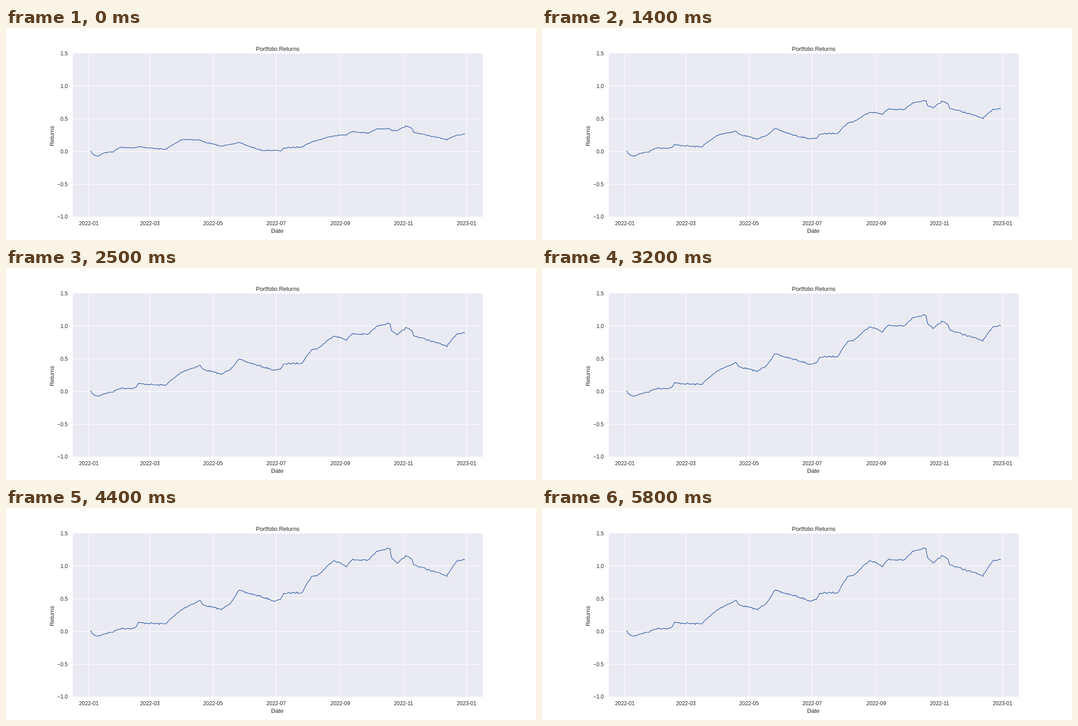
These frames come from a looping animation (1183x473 px, 5900 ms). An HTML page:

```html
<!DOCTYPE html>
<html lang="en">
<head>
<meta charset="utf-8">
<title>Portfolio Returns</title>
<style>
  html, body { margin: 0; height: 100%; overflow: hidden; background: #fff; }
  svg { display: block; }
  text { font: 11.92px "Liberation Sans", Arial, sans-serif; fill: #262626; text-anchor: middle; }
  .big { font-size: 13px; }
  .y { text-anchor: end; }
  #grid { stroke: #fff; stroke-width: 1.1; }
  #curve { fill: none; stroke: #4c72b0; stroke-width: 1.63; stroke-linejoin: round; stroke-linecap: round; }
</style>
</head>
<body>
<svg width="1183" height="473" viewBox="0 0 1183 473">
  <rect x="149" y="57" width="915" height="364" fill="#eaeaf2"/>
  <path id="grid"/>
  <g id="labels"></g>
  <text class="big" x="606.5" y="50.5">Portfolio Returns</text>
  <text class="big" x="605.5" y="456.5">Date</text>
  <text class="big" transform="translate(107.3 241) rotate(-90)">Returns</text>
  <polyline id="curve"/>
</svg>
<script>
const LOOP = 5900, STEP = 100;
const $ = id => document.getElementById(id);
const dayX = day => 184.85 + day * 2.31;

// Turning points: x, first height, settled height
const turns = [
  [189,275,275], [195,283,283], [206,286,286], [218,278,281], [240,276,276], [252,266,269],
  [288,267,268], [296,265,256], [355,271,259], [394,248,225], [434,250,206], [438,253,216],
  [481,264,227], [500,259,213], [520,256,185], [570,273,198], [601,273,209], [614,275,204],
  [619,268,191], [660,265,189], [681,255,155], [697,250,150], [732,240,117], [760,238,131],
  [773,231,116], [808,235,118], [831,224,95], [857,225,91], [860,228,110], [873,230,126],
  [892,219,108], [905,223,114], [911,233,128], [984,249,152], [1008,239,118], [1024,236,115]];

function height(x, col) {
  const i = turns.findIndex(p => p[0] >= x);
  const a = turns[i - 1], b = turns[i];
  return a[col] + (b[col] - a[col]) * (x - a[0]) / (b[0] - a[0]);
}

let seed = 7;
const random = () => (seed = seed * 16807 % 2147483647) / 2147483647;
const hump = (x, mid, width) => Math.exp(-(((x - mid) / width) ** 2));

// One point per trading day; the year starts on a Saturday
const points = [];
for (let day = 2; day <= 363; day++) {
  if (day % 7 < 2) continue;
  const x = dayX(day);
  points.push({ x, from: height(x, 1), to: height(x, 2), noise: random() - .5,
                sag: hump(x, 670, 170), lift: hump(x, 925, 75) });
}

function label(text, x, y, cls = "") {
  $("labels").insertAdjacentHTML("beforeend", `<text class="${cls}" x="${x}" y="${y}">${text}</text>`);
}

let grid = "";
["1.5", "1.0", "0.5", "0.0", "−0.5", "−1.0"].forEach((text, i) => {
  const y = 57 + i * 72.8;
  label(text, 138, y + 4.4, "y");
  if (i % 5) grid += `M149 ${Math.floor(y) + .5}H1064`;
});
for (let month = 0; month <= 12; month += 2) {
  const date = new Date(Date.UTC(2022, month, 1));
  const x = dayX((date - Date.UTC(2022, 0, 1)) / 864e5);
  label(date.toISOString().slice(0, 7), x.toFixed(1), 440.2);
  grid += `M${Math.floor(x) + .5} 57V421`;
}
$("grid").setAttribute("d", grid);

function draw(now) {
  const t = Math.floor(now % LOOP / STEP) * STEP / 1000;
  const blend = 1.01 * Math.sin(Math.PI / 2 * Math.min(t / 4.6, 1));
  const early = Math.min(t / 3.2, 1);
  const sag = 6 * Math.sin(Math.PI * early ** 1.5);
  const lift = 6 * Math.sin(Math.PI * Math.sqrt(early));
  $("curve").setAttribute("points", points.map(p => {
    const y = p.from + (p.to - p.from) * blend + sag * p.sag - lift * p.lift
      + p.noise * (2 + 1.5 * blend);
    return `${p.x.toFixed(2)},${y.toFixed(2)}`;
  }).join(" "));
}

const begin = performance.now();
function tick() {
  draw(performance.now() - begin);
  requestAnimationFrame(tick);
}
tick();
</script>
</body>
</html>
```
